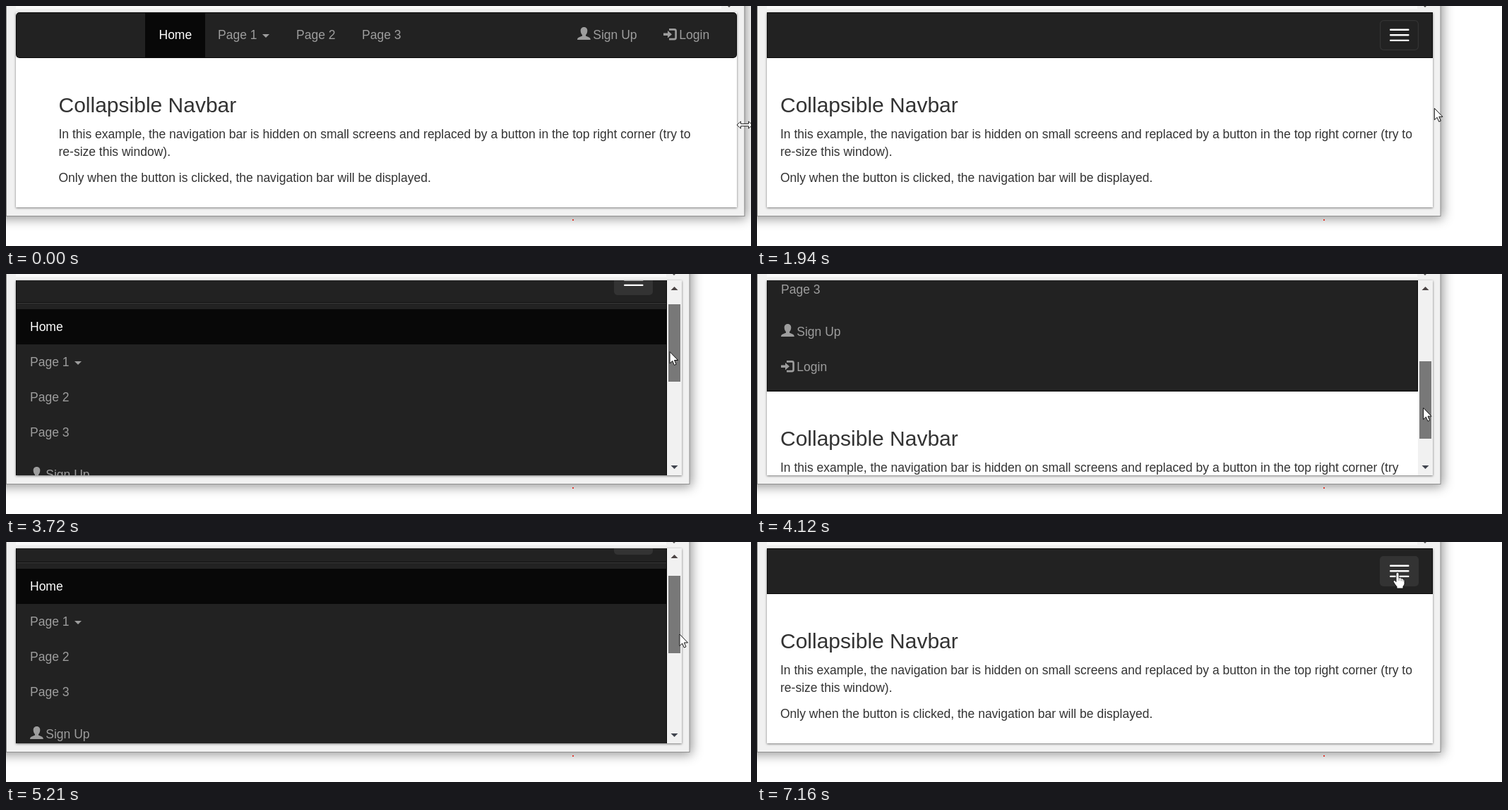
Animation, 1055 px wide and 341 px high, one loop 7540 ms. Source, as an HTML page with a canvas:

```html
<!DOCTYPE html>
<html lang="en">
<head>
<meta charset="utf-8">
<title>Collapsible Navbar</title>
<style>
  html, body { margin: 0; width: 100%; height: 100%; overflow: hidden; background: #fff; }
  canvas { display: block; }
</style>
</head>
<body>
<canvas id="stage" width="1055" height="341"></canvas>
<script>
const ctx = document.getElementById('stage').getContext('2d');
const LOOP = 7540;
const LEFT = 14, TOP = 9, BOTTOM = 286, VIEW = BOTTOM - TOP;
const BAR = 74, MENU = 329, TRACK = 236, LAG = 77;
const GREY = '#9d9d9d', BLACK = '#080808';

// Bursts of motion: start, end, number of steps. The picture rests in between.
const bursts = [
  [710, 1400, 10], [1470, 1630, 3], [1940, 2320, 6], [2470, 3180, 10], [3250, 3490, 4],
  [3650, 4270, 9], [4580, 5280, 10], [5360, 5590, 4], [5740, 6140, 6], [6460, 6780, 5], [7160, 7161, 1]
];
const edgeKeys = [[633, 1045.5], [780, 1038], [1016, 1012], [1093, 1002], [1400, 981], [1553, 968]];
const scrollKeys = [[3580, 0], [3650, 10], [3725, 32], [4270, 317], [4500, 317], [4736, 197],
  [4970, 95], [5280, 28], [5590, 0]];
const pointerKeys = [[1862, 968, 169], [2320, 917, 30], [2550, 917, 30], [2940, 901, 43], [3180, 901, 45],
  [3490, 940, 98], [3725, 940, 110], [4270, 945, 222], [4500, 945, 221], [4736, 955, 172],
  [5590, 953, 97], [5670, 953, 97], [6140, 900, 44], [7159, 900, 44], [7160, 907, 43]];

function snap(t) {
  const burst = bursts.filter(b => b[0] <= t).pop();
  if (!burst) return 0;
  const [start, end, n] = burst;
  const step = (end - start) / (n - 1 || 1);
  return start + step * Math.min(n - 1, Math.floor((t - start) / step + 0.15));
}

function track(keys, t, i = 1) {
  const next = keys.findIndex(k => k[0] > t);
  if (next === 0) return keys[0][i];
  if (next < 0) return keys[keys.length - 1][i];
  const a = keys[next - 1], b = keys[next];
  return a[i] + (b[i] - a[i]) * (t - a[0]) / (b[0] - a[0]);
}

// CSS "ease": cubic-bezier(.25, .1, .25, 1)
function ease(x) {
  if (x <= 0 || x >= 1) return x <= 0 ? 0 : 1;
  const bezier = (p, q, u) => 3 * p * u * (1 - u) ** 2 + 3 * q * u * u * (1 - u) + u ** 3;
  let lo = 0, hi = 1;
  for (let i = 0; i < 24; i++) {
    const mid = (lo + hi) / 2;
    if (bezier(0.25, 0.25, mid) < x) lo = mid; else hi = mid;
  }
  return bezier(0.1, 1, lo);
}

function rect(x, y, w, h, color, radius = 0) {
  ctx.fillStyle = color;
  ctx.beginPath();
  ctx.roundRect(x, y, w, h, radius);
  ctx.fill();
}

function text(str, x, y, color = '#333', size = 17.5) {
  ctx.font = `${size}px "Liberation Sans", Arial, sans-serif`;
  ctx.fillStyle = color;
  ctx.fillText(str, x, y);
}

function shape(d, x, y, fill, stroke, width = 1) {
  const path = new Path2D(d);
  ctx.save();
  ctx.translate(x, y);
  if (fill) { ctx.fillStyle = fill; ctx.fill(path); }
  if (stroke) { ctx.strokeStyle = stroke; ctx.lineWidth = width; ctx.lineJoin = 'round'; ctx.stroke(path); }
  ctx.restore();
}

const down = (x, y, color) => shape('M0 0H10L5 5Z', x, y, color);
const up = (x, y, color) => shape('M0 5H10L5 0Z', x, y, color);

function signUp(x, y) {
  shape('M9.5 0C13 0 14.5 2.5 14.3 5.5C14.1 8.5 13 10 12 11V12.6C15 14 18.8 14.6 18.8 18H0' +
    'C0 14.6 4 14 7 12.6V11C6 10 4.9 8.5 4.7 5.5C4.5 2.5 6 0 9.5 0Z', x, y - 17, GREY);
  text('Sign Up', x + 22.3, y, GREY);
}

function login(x, y) {
  shape('M0 6.5H6V3L12 8.2L6 13.5V10H0Z', x, y - 15, GREY);
  shape('M8 1.4H15.5Q17.6 1.4 17.6 3.5V13Q17.6 15.1 15.5 15.1H8', x, y - 15, null, GREY, 2.6);
  text('Login', x + 22.3, y, GREY);
}

function drawWindow(edge, right) {
  ctx.save();
  ctx.shadowColor = 'rgba(0,0,0,.42)';
  ctx.shadowBlur = 15;
  ctx.shadowOffsetX = ctx.shadowOffsetY = 3;
  rect(-20, -40, edge + 20, 338.5, '#f1f1f1');
  ctx.restore();
  ctx.strokeStyle = '#8f8f8f';
  ctx.lineWidth = 1;
  ctx.strokeRect(0.5, -10, Math.round(edge) - 0.5, 308.5);
  rect(LEFT, 0, right - LEFT - 22, 4, '#fafafa');
  down(right - 16, -3, '#505050');
  ctx.save();
  ctx.shadowColor = 'rgba(0,0,0,.5)';
  ctx.shadowBlur = 3;
  ctx.shadowOffsetY = 1;
  rect(LEFT, TOP, right - LEFT, VIEW, '#fff');
  ctx.restore();
  rect(802, 303, 2, 2, '#e03a30');
}

function drawWideBar(right) {
  rect(LEFT, TOP, right - LEFT, 65, BLACK, 5);
  rect(LEFT + 1, TOP + 1, right - LEFT - 2, 63, '#222', 4);
  rect(197, 10, 85, 63, BLACK);
  text('Home', 216.5, 47, '#fff');
  text('Page 1', 300, 47, GREY);
  down(363, 40, GREY);
  text('Page 2', 411, 47, GREY);
  text('Page 3', 504, 47, GREY);
  signUp(right - 226, 47);
  login(right - 104, 47);
}

function drawNarrowBar(right, barBottom, lit) {
  rect(LEFT, TOP, right - LEFT, barBottom - TOP, BLACK);
  rect(LEFT + 1, TOP + 1, right - LEFT - 2, barBottom - TOP - 2, '#222');
  const x = right - 75;
  if (lit) rect(x, 20, 55, 43, '#333', 5);
  else {
    ctx.strokeStyle = '#333';
    ctx.lineWidth = 1.2;
    ctx.beginPath();
    ctx.roundRect(x + 0.6, 20.6, 53.8, 41.8, 5);
    ctx.stroke();
  }
  for (let i = 0; i < 3; i++) rect(x + 14, 32.5 + 7.6 * i, 27.5, 2.4, '#fff', 1);
  if (barBottom <= BAR) return;

  ctx.save();
  ctx.beginPath();
  ctx.rect(LEFT, TOP, right - LEFT, barBottom - TOP - 1);
  ctx.clip();
  rect(LEFT + 1, 73, right - LEFT - 2, 1, '#101010');
  rect(LEFT + 1, 74, right - LEFT - 2, 1, '#393939');
  rect(LEFT, 83, right - LEFT, 50, BLACK);
  ['Home', 'Page 1', 'Page 2', 'Page 3'].forEach((label, i) =>
    text(label, 34, 114 + 50 * i, i ? GREY : '#fff'));
  down(97, 157, GREY);
  signUp(34, 324);
  login(34, 374);
  ctx.restore();
}

function drawArticle(x, dy, short) {
  const line = 'In this example, the navigation bar is hidden on small screens and replaced ' +
    'by a button in the top right corner (try';
  text('Collapsible Navbar', x, 151 + dy, '#333', 30);
  text(line + (short ? '' : ' to'), x, 188 + dy);
  text((short ? 'to ' : '') + 're-size this window).', x, 213 + dy);
  text('Only when the button is clicked, the navigation bar will be displayed.', x, 250 + dy);
}

function drawScrollbar(right, top, height, scroll, color) {
  rect(right, TOP, 21, VIEW, '#f1f1f1');
  rect(right + 2, top, 17, height, color);
  up(right + 5.5, 18, scroll > 0 ? '#4a4444' : '#a8a8a8');
  down(right + 5.5, 272, '#40444e');
}

function drawPointer(kind, x, y) {
  if (kind === 'resize') {
    shape('M-11 0L-5.5 -5V-1.6H5.5V-5L11 0L5.5 5V1.6H-5.5V5Z', x, y, '#fff', '#222');
  } else if (kind === 'hand') {
    shape('M-2 2Q-2 0 0 0Q2 0 2 2V8Q4.5 6.8 5.2 8.8Q7.5 7.8 8 10Q10 9.5 10 12V17Q9 19 8 20V23H-1' +
      'V20.5Q-4 17 -5.8 13.6Q-6.2 11 -4 11.4L-2 13.5Z', x, y, '#fff', '#111', 0.9);
    shape('M2 8V12M5.2 9V12.5M8 10V13', x, y, null, '#555', 0.7);
  } else {
    shape('M0 0V16.5L3.8 13L6.4 19L9 17.8L6.5 12H11.6Z', x, y, '#fff', '#111');
  }
}

function draw(t) {
  const edge = track(edgeKeys, t);
  const right = Math.round(track(edgeKeys, t - LAG) - 11);
  const narrow = right < 974;
  const open = ease((t - 2433) / 350) - ease((t - 6422) / 350);
  const barBottom = Math.round(BAR + MENU * open);
  const height = barBottom - TOP + 200;
  const scrolls = height > VIEW;
  const inner = right - (scrolls ? 21 : 0);
  const scroll = Math.round(track(scrollKeys, t));
  const thumbTop = Math.round(30 + TRACK * scroll / height);
  const thumbHeight = Math.round(TRACK * VIEW / height);

  const resizing = t < 1940;
  const x = resizing ? edge + 0.5 : track(pointerKeys, t);
  const y = resizing ? 169 : track(pointerKeys, t, 2);
  const overButton = !resizing && y < 63 && x < inner - 18 && x > inner - 75;
  const overThumb = x >= inner + 2 && x <= inner + 19 && y >= thumbTop && y <= thumbTop + thumbHeight;
  const dragging = t >= 3650 && t < 5740;

  ctx.fillStyle = '#fff';
  ctx.fillRect(0, 0, 1055, 341);
  drawWindow(edge, right);

  ctx.save();
  ctx.beginPath();
  ctx.rect(LEFT, TOP, right - LEFT, VIEW);
  ctx.clip();
  ctx.save();
  ctx.translate(0, -scroll);
  if (narrow) drawNarrowBar(inner, barBottom, overButton || t >= 2433);
  else drawWideBar(right);
  const margin = Math.max(0, (inner - LEFT - 937.5) / 2);
  drawArticle(narrow ? 33 : LEFT + 18.75 + margin, barBottom - BAR, scrolls);
  ctx.restore();
  if (scrolls) {
    drawScrollbar(inner, thumbTop, thumbHeight, scroll, dragging ? '#787878' : overThumb ? '#a8a8a8' : '#c1c1c1');
  }
  ctx.restore();

  drawPointer(resizing ? 'resize' : overButton ? 'hand' : 'arrow', x, y);
}

const begin = performance.now();
function frame() {
  draw(snap((performance.now() - begin) % LOOP));
  requestAnimationFrame(frame);
}
frame();
</script>
</body>
</html>
```
